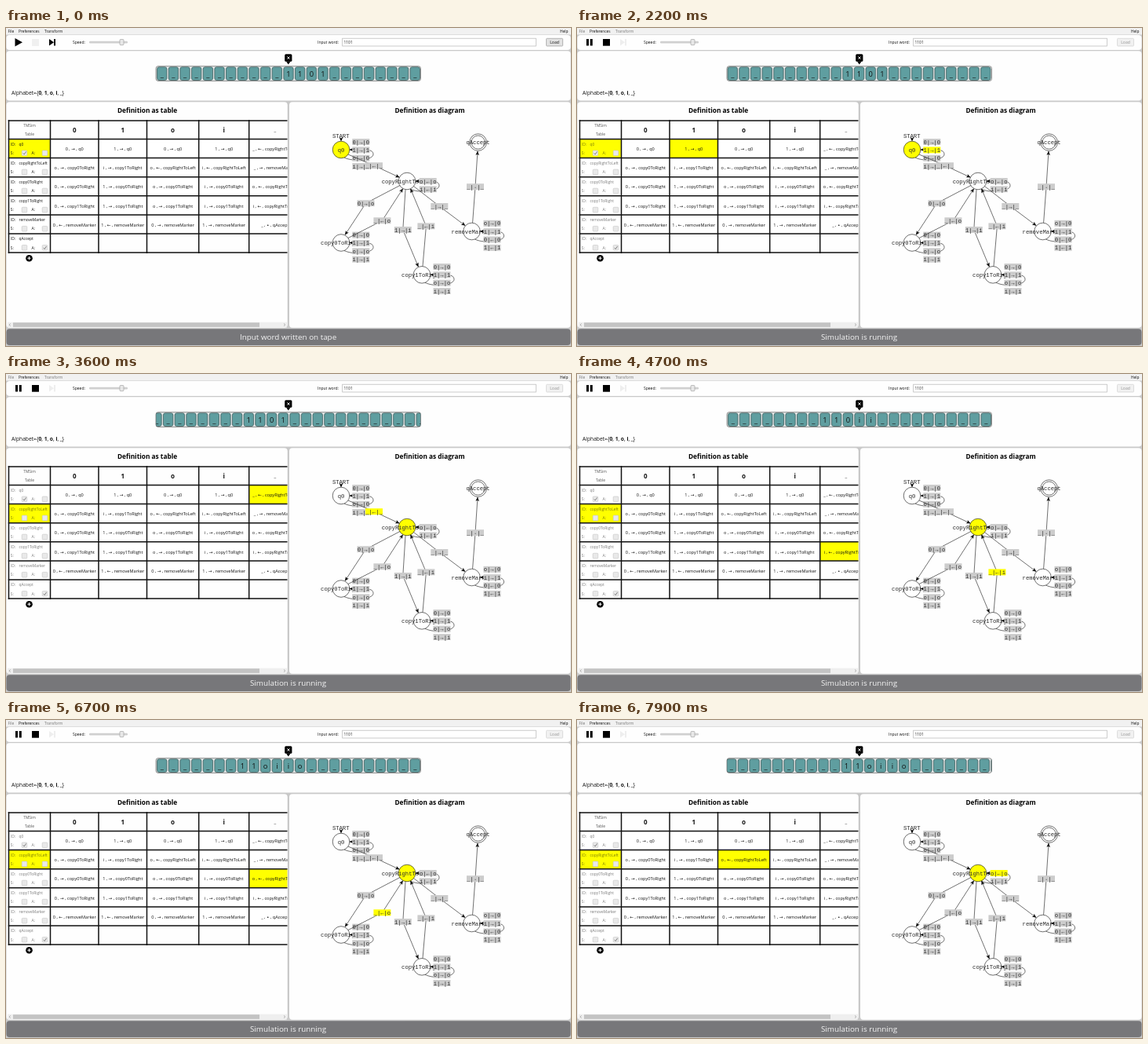
Write an HTML page that moves like this. It is 720 px wide and 405 px high and loops after 8000 ms.

```html
<!DOCTYPE html>
<html lang="en">
<head>
<meta charset="utf-8">
<title>Turing machine simulator</title>
<style>
  html, body { margin: 0; width: 100%; height: 100%; overflow: hidden; background: #c9c9c9; }
  svg { display: block; width: 720px; height: 405px; }
  text { font-family: "Open Sans", "Noto Sans", "DejaVu Sans", sans-serif; white-space: pre; }
  .mono { font-family: "Liberation Mono", "DejaVu Sans Mono", monospace; }
</style>
</head>
<body>
<svg id="stage" viewBox="0 0 720 405"></svg>
<script>
const LOOP = 8000, FRAME = 100;
const RUN_AT = 900, FIRST_STEP = 1747, STEP = 422, MOVE = 310;
const PITCH = 14.66, HEAD_X = 360;
const YELLOW = '#ffff00', GREY = '#cccccc';

// Per state, one "write, move, next state" rule for each symbol.
const symbols = ['0', '1', 'o', 'i', '_'];
const rules = {
  q0: '0→q0 1→q0 0→q0 1→q0 _←copyRightToLeft',
  copyRightToLeft: 'o→copy0ToRight i→copy1ToRight o←copyRightToLeft i←copyRightToLeft _→removeMarker',
  copy0ToRight: '0→copy0ToRight 1→copy0ToRight o→copy0ToRight i→copy0ToRight o←copyRightToLeft',
  copy1ToRight: '0→copy1ToRight 1→copy1ToRight o→copy1ToRight i→copy1ToRight i←copyRightToLeft',
  removeMarker: '0←removeMarker 1←removeMarker 0→removeMarker 1→removeMarker _∙qAccept',
  qAccept: ''
};
const states = Object.keys(rules);
for (const s of states) {
  rules[s] = rules[s].split(' ').filter(Boolean)
    .map(r => ({ write: r[0], dir: r[1], next: r.slice(2) }));
}

function simulate(count) {
  const tape = { 0: '1', 1: '1', 2: '0', 3: '1' };
  let pos = 0, state = 'q0';
  const list = [{ tape: { ...tape }, pos, from: pos, state, rule: null }];
  for (let i = 0; i < count; i++) {
    const symbol = tape[pos] || '_';
    const { write, dir, next } = rules[state][symbols.indexOf(symbol)];
    const rule = state + symbol, from = pos;
    tape[pos] = write;
    pos += dir === '→' ? 1 : dir === '←' ? -1 : 0;
    state = next;
    list.push({ tape: { ...tape }, pos, from, state, rule });
  }
  return list;
}
const history = simulate(Math.ceil((LOOP - FIRST_STEP) / STEP));

const svg = document.getElementById('stage');
function el(parent, tag, attrs = {}) {
  const node = document.createElementNS('http://www.w3.org/2000/svg', tag);
  for (const key in attrs) node.setAttribute(key, attrs[key]);
  parent.append(node);
  return node;
}
const group = (parent, attrs) => el(parent, 'g', attrs);
const rect = (parent, x, y, width, height, fill, more) =>
  el(parent, 'rect', { x, y, width, height, fill, ...more });
const path = (parent, d, more) =>
  el(parent, 'path', { d, fill: 'none', stroke: '#111', 'stroke-width': 0.6, ...more });
const solid = (parent, d, fill = '#000') => el(parent, 'path', { d, fill });
// cy is the middle of the capital letters.
function text(parent, x, cy, size, string, more) {
  const node = el(parent, 'text', { x, y: cy + size * 0.35, 'font-size': size, fill: '#111', ...more });
  node.textContent = string;
  return node;
}
const middle = { 'text-anchor': 'middle' };
const mono = { ...middle, class: 'mono', fill: '#2a2a2a' };
function clip(id, x, y, w, h, rx = 0) {
  rect(el(svg, 'clipPath', { id }), x, y, w, h, '#000', { rx });
  return { 'clip-path': `url(#${id})` };
}

// Panels
rect(svg, 0, 0, 720, 405, '#c9c9c9');
rect(svg, 0, 0, 720, 8.5, '#f1f1f1');
for (const [x, y, w, h] of [[0.5, 9, 719, 19], [0.5, 29.3, 719, 63.2], [0.5, 94.3, 358.2, 287.5], [361, 94.3, 358.5, 287.5]])
  rect(svg, x, y, w, h, '#fefefe', { rx: 4 });
rect(svg, 0.5, 383.3, 719, 20.7, '#77777a', { rx: 4 });

// Menu and toolbar
const fileMenu = text(svg, 2.5, 4, 4.8, 'File');
text(svg, 16, 4, 4.8, 'Preferences');
const transformMenu = text(svg, 49, 4, 4.8, 'Transform');
text(svg, 706, 4, 4.8, 'Help');

const idleIcons = group(svg), runIcons = group(svg);
solid(idleIcons, 'M11.5 13L21 18.2L11.5 23.4Z');
rect(idleIcons, 33, 14, 9, 9, '#f0f0f0');
const skip = 'M55 14L61 18.2L55 22.5ZM61 14H63V22.5H61Z';
solid(idleIcons, skip);
solid(runIcons, 'M12 14H15V22.5H12ZM16.8 14H19.8V22.5H16.8Z');
rect(runIcons, 33, 14, 9, 8.7, '#000');
solid(runIcons, skip, '#eee');

text(svg, 85, 18, 5, 'Speed:');
rect(svg, 106, 16.8, 49, 2.6, '#d0d0d0', { rx: 1.2 });
rect(svg, 145, 14.5, 5, 7.2, '#e8e8e8', { rx: 1, stroke: '#999', 'stroke-width': 0.6 });
text(svg, 397, 18, 5, 'Input word:');
rect(svg, 428.7, 13.2, 246.6, 9.8, '#fff', { stroke: '#b4b4b4', 'stroke-width': 0.7 });
text(svg, 430.5, 18.2, 4.9, '1101');
const load = group(svg);
rect(load, 688.5, 13.3, 21, 9.7, '#e2e2e2', { rx: 1, stroke: '#9c9c9c', 'stroke-width': 0.7 });
text(load, 699, 18.2, 5, 'Load', middle);

// Tape
const TAPE = [191, 48.6, 337.5, 18.9];
rect(svg, ...TAPE, '#e6eaea', { rx: 3 });
const cells = group(group(svg, clip('tapeClip', ...TAPE, 3)));
const tapeTexts = {};
for (let i = -13; i <= 18; i++) {
  const x = HEAD_X + i * PITCH;
  rect(cells, x - 6.2, 49.8, 12.4, 16.7, '#5f9ea0', { rx: 2.4, stroke: '#344f50', 'stroke-width': 0.7 });
  tapeTexts[i] = text(cells, x, 58.3, 9.4, '_', middle);
}
rect(svg, ...TAPE, 'none', { rx: 3, stroke: '#666', 'stroke-width': 0.7 });
rect(svg, 355.2, 33.2, 9.2, 9.6, '#000', { rx: 1.5 });
solid(svg, 'M357 42.5H362.6L359.8 46.5Z');
path(svg, 'M358.4 36.4L361.4 39.5M361.4 36.4L358.4 39.5', { stroke: '#fff', 'stroke-width': 1 });

const alphabet = text(svg, 7, 82.4, 6.7, 'Alphabet={');
symbols.forEach((s, i) => {
  el(alphabet, 'tspan', { 'font-weight': 700 }).textContent = s;
  el(alphabet, 'tspan').textContent = i < 4 ? ', ' : '}';
});

const title = { ...middle, 'font-weight': 700, fill: '#000' };
text(svg, 180, 105, 8.3, 'Definition as table', title);
text(svg, 540, 105, 8.3, 'Definition as diagram', title);

// Table
const marks = {};        // fills to switch per state or rule
const mark = (key, node, base) => (marks[key] ||= []).push({ node, base });
const table = group(svg, clip('tableClip', 1, 110, 357.5, 190));
const colX = [3.5, 56.5, 118, 179.5, 245.7, 309.7, 376];
const rowY = i => 141.5 + i * 24.1;
const colMid = i => (colX[i] + colX[i + 1]) / 2;
const idTexts = [];

function checkbox(x, y, on) {
  rect(table, x, y, 6.6, 6.6, '#e9e9e9', { rx: 1, stroke: '#c4c4c4', 'stroke-width': 0.6 });
  if (on) path(table, `M${x + 1.5} ${y + 3.4}l1.5 1.6l2.4 -3.6`, { stroke: '#777', 'stroke-width': 0.9 });
}
text(table, 30, 124.3, 4.9, 'TMSim', { ...middle, fill: '#555' });
text(table, 30, 135.3, 4.9, 'Table', { ...middle, fill: '#555' });
symbols.forEach((s, i) => text(table, colMid(i + 1), 130, i < 4 ? 8 : 6, s,
  { ...middle, 'font-weight': i < 4 ? 700 : 400 }));

states.forEach((state, r) => {
  const y = rowY(r);
  mark(state, rect(table, colX[0], y, 53.5, 24.1, '#fff'), '#fff');
  for (const [x, dy, s] of [[5.8, 6.7, 'ID:'], [16.5, 6.7, state], [5.8, 17.8, 'S:'], [32.5, 17.8, 'A:']])
    idTexts.push(text(table, x, y + dy, 4.9, s));
  checkbox(20.2, y + 14.5, state === 'q0');
  checkbox(46.2, y + 14.5, state === 'qAccept');
  rules[state].forEach(({ write, dir, next }, i) => {
    const x = colX[i + 1];
    mark(state + symbols[i], rect(table, x, y, colX[i + 2] - x, 24.1, '#fff'), '#fff');
    text(table, colMid(i + 1), y + 12.8, 5.6, `${write} , ${dir} , ${next}`, middle);
  });
});
const grid = colX.map(x => `M${x} 117V287`).join('') +
  [118, ...Array.from({ length: 7 }, (_, i) => rowY(i))].map(y => `M2.6 ${y}H376`).join('');
path(table, grid, { 'stroke-width': 1.5 });
el(svg, 'circle', { cx: 29.5, cy: 293.2, r: 4.3 });
path(svg, 'M27.3 293.2H31.7M29.5 291V295.4', { stroke: '#fff', 'stroke-width': 1 });

rect(svg, 2, 374.6, 356, 6.8, '#efefef');
rect(svg, 9, 375.2, 314, 5.6, '#c3c3c3');
path(svg, 'M5.8 376.4L4 378L5.8 379.6M354 376.4L355.8 378L354 379.6', { stroke: '#888' });

// Diagram
const nodes = {
  q0: [427, 155], copyRightToLeft: [511, 195], copy0ToRight: [427, 273.5],
  copy1ToRight: [530, 314.3], removeMarker: [593.5, 259], qAccept: [601.6, 145.6]
};
const loops = {          // label column, first label row, symbols in order
  q0: [452.3, 145, '01oi'], copyRightToLeft: [537.7, 195, 'oi'], copy0ToRight: [452.3, 263.6, '01oi'],
  copy1ToRight: [555.5, 304, '01oi'], removeMarker: [619.5, 248.8, 'oi01']
};
const edges = [          // rule key, then start, label and end points
  ['q0_', [436, 161], [469, 175.2], [501.5, 190.3]],
  ['copyRightToLeft0', [502, 200.5], [458.5, 223.2], [432, 263.5]],
  ['copyRightToLeft1', [509, 205.8], [505.8, 257], [525.5, 304.3]],
  ['copyRightToLeft_', [519.5, 201.5], [552.3, 227], [585.3, 251.8]],
  ['copy0ToRight_', [436, 267.5], [479.4, 245.3], [505.8, 204.5]],
  ['copy1ToRight_', [531, 303.4], [535.4, 252.4], [515.5, 204.8]],
  ['removeMarker_', [594.6, 248], [598, 202.2], [601, 156.8]]
];
function arrowHead([x, y], angle) {
  el(svg, 'path', { d: 'M0 0L-5.2 -2.3L-4 0L-5.2 2.3Z', transform: `translate(${x} ${y}) rotate(${angle})` });
}
function label(x, y, key) {
  const symbol = key.slice(-1);
  const { write, dir } = rules[key.slice(0, -1)][symbols.indexOf(symbol)];
  mark(key, rect(svg, x - 11, y - 4, 22, 8, GREY), GREY);
  text(svg, x, y, 7.2, `${symbol}|${dir}|${write}`, mono);
}

text(svg, 426.7, 137.4, 7.2, 'START', mono);
arrowHead([427, 144.5], 90);
for (const state of states) {
  const [cx, cy] = nodes[state];
  const ring = { cx, cy, fill: '#fff', stroke: '#222', 'stroke-width': 0.65 };
  mark(state, el(svg, 'circle', { ...ring, r: 10.8 }), '#fff');
  if (state === 'qAccept') el(svg, 'circle', { ...ring, r: 8.6 });
  text(svg, cx, cy, 7.2, state, mono);
}
for (const state in loops) {
  const [cx, cy] = nodes[state], [x, y, keys] = loops[state];
  path(svg, `M${cx + 4} ${cy + 10}C${cx + 16} ${cy + 16} ${cx + 41} ${cy + 13} ${cx + 41} ${cy + 6}S${cx + 32} ${cy} ${cx + 11} ${cy}`);
  arrowHead([cx + 10.5, cy], 180);
  [...keys].forEach((s, i) => label(x, y + i * 10.35, state + s));
}
for (const [, from, via, to] of edges) {
  path(svg, `M${from}L${via}L${to}`);
  arrowHead(to, Math.atan2(to[1] - via[1], to[0] - via[0]) * 180 / Math.PI);
}
for (const [key, , via] of edges) label(...via, key);

const status = text(svg, 359.6, 393.6, 9.85, '', { ...middle, fill: '#f4f4f4' });

// Accelerates over the first fifth, slows down over the last.
function easeBoth(u) {
  if (u < 0.2) return 3.125 * u * u;
  if (u > 0.8) return 1 - 3.125 * (1 - u) ** 2;
  return 1.25 * u - 0.125;
}

function render(t) {
  const running = t >= RUN_AT;
  idleIcons.style.display = running ? 'none' : '';
  runIcons.style.display = running ? '' : 'none';
  load.style.opacity = running ? 0.45 : 1;
  status.textContent = running ? 'Simulation is running' : 'Input word written on tape';
  for (const node of [fileMenu, transformMenu, ...idTexts])
    node.setAttribute('fill-opacity', running ? 0.55 : 1);

  const index = Math.max(0, Math.floor((t - FIRST_STEP) / STEP) + 1);
  const { tape, pos, from, state, rule } = history[index];
  const since = t - FIRST_STEP - (index - 1) * STEP;
  const head = from + (pos - from) * easeBoth(Math.min(1, since / MOVE));
  cells.setAttribute('transform', `translate(${-head * PITCH} 0)`);
  for (const i in tapeTexts) tapeTexts[i].textContent = tape[i] || '_';
  for (const key in marks)
    for (const { node, base } of marks[key])
      node.setAttribute('fill', key === state || key === rule ? YELLOW : base);
}

const start = performance.now();
function tick() {
  const t = Math.max(0, performance.now() - start) % LOOP;
  render(Math.floor(t / FRAME) * FRAME);
  requestAnimationFrame(tick);
}
tick();
</script>
</body>
</html>
```
